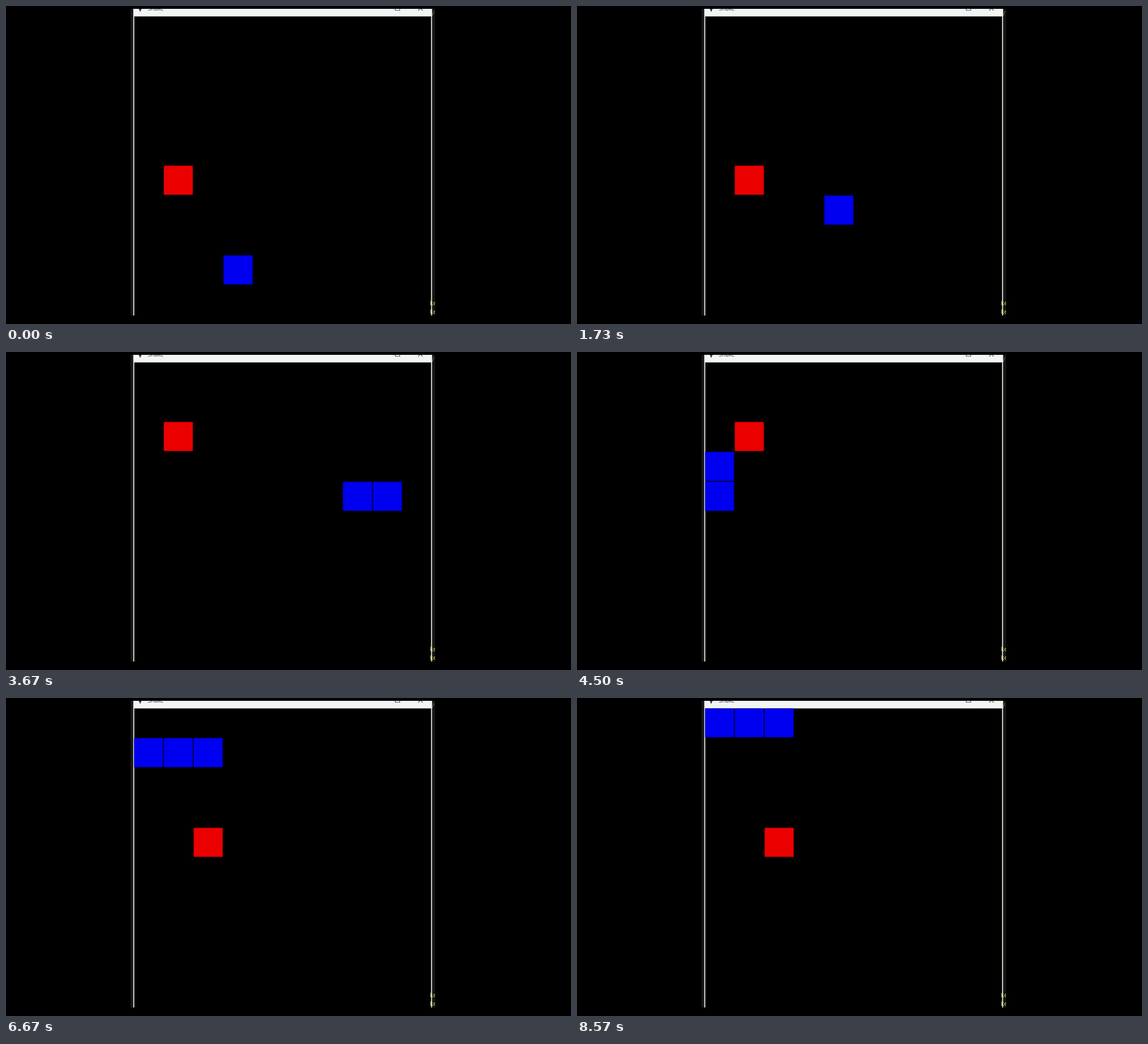
Write an HTML page with a canvas that moves like this. It is 998 by 561 pixels and loops after 8.61 s.

```html
<!DOCTYPE html>
<html lang="en">
<head>
<meta charset="utf-8">
<title>Snake</title>
<style>
  html, body { margin: 0; width: 100%; height: 100%; overflow: hidden; background: #000; }
  canvas { display: block; }
</style>
</head>
<body>
<canvas id="stage" width="998" height="561"></canvas>
<script>
const ctx = document.getElementById('stage').getContext('2d');
const LOOP = 8610;
const STEP = 52.75, LEFT = 225.6, TOP = 17.6, SIZE = 52;

// Sweep upwards, left on even rows and right on odd ones.
function sweep(col, row) {
  const path = [];
  for (; row >= 0; row--) {
    const dir = row % 2 ? 1 : -1;
    const end = row === 7 ? 8 : row % 2 ? 9 : 0;
    for (; col !== end; col += dir) path.push([col, row]);
    path.push([col, row]);
  }
  return path;
}

const route = sweep(3, 8);
const foods = [[1, 5], [1, 2], [2, 4]];
const meals = foods.slice(0, 2).map(food => route.findIndex(pos => `${pos}` === `${food}`));

// [move number, ms]; the pace is even in between, with a stall before move 15.
const pace = [[0, 0], [14, 1410], [15, 1600], [17, 1725], [42, 4480], [55, 5720], [72, 7480], [81, 8550]];

function moveAt(t) {
  const i = pace.findIndex(([, ms]) => t < ms);
  if (i < 0) return route.length - 1;
  const [n0, t0] = pace[i - 1], [n1, t1] = pace[i];
  return Math.floor(n0 + (n1 - n0) * (t - t0) / (t1 - t0));
}

function box(color, x, y, w, h) {
  ctx.fillStyle = color;
  ctx.fillRect(x, y, w, h);
}

function cell([c, r], color, edge) {
  const x = LEFT + c * STEP, y = TOP + r * STEP;
  box(edge, x, y, SIZE, SIZE);
  box(color, x + 0.8, y + 0.8, SIZE - 1.6, SIZE - 1.6);
}

function line(color, width, ...points) {
  ctx.strokeStyle = color;
  ctx.lineWidth = width;
  ctx.beginPath();
  points.forEach(([x, y]) => ctx.lineTo(x, y));
  ctx.stroke();
}

function label(text, x, y, font, color) {
  ctx.font = font;
  ctx.fillStyle = color;
  ctx.fillText(text, x, y);
}

function clip(x, y, w, h) {
  ctx.beginPath();
  ctx.rect(x, y, w, h);
  ctx.clip();
}

function drawWindow() {
  box('#17171b', 220, 5, 5, 541);
  box('#151512', 752, 5, 6, 541);
  box('#000', 226, 18, 525, 528);
  for (const y of [528, 543]) {
    label('ke', 748.5, y, '10px "DejaVu Sans Mono", monospace', '#d2d44a');
  }
  line('#77776c', 1, [753, 17], [756, 9]);

  box('#f4f4ec', 224.8, 5, 1.7, 541);
  box('#f4f4ec', 750.8, 5, 1.7, 541);
  box('#f1f5f3', 225, 5, 527.4, 13.4);

  ctx.fillStyle = '#33363a';
  ctx.beginPath();
  ctx.moveTo(234.5, 5);
  ctx.lineTo(239.5, 5);
  ctx.lineTo(237, 10.5);
  ctx.fill();
  label('Snake', 250.5, 8, '10px "Open Sans", sans-serif', '#33363a');
  line('#555a78', 1.2, [687.5, 4], [687.5, 7.5], [695.5, 7.5], [695.5, 4]);
  line('#55585c', 1.2, [728, 8], [732, 4], [736, 8]);
}

function draw(t) {
  const n = moveAt(t);
  const eaten = meals.filter(m => n >= m).length;
  box('#000', 0, 0, 998, 561);
  ctx.save();
  clip(220, 5, 538, 541);
  drawWindow();
  clip(226.3, 18.4, 524.5, 528);
  cell(foods[eaten], '#eb0000', '#800000');
  for (const pos of route.slice(Math.max(0, n - eaten), n + 1)) cell(pos, '#0000f0', '#000080');
  ctx.restore();
}

const start = performance.now();
function tick() {
  draw((performance.now() - start) % LOOP);
  requestAnimationFrame(tick);
}
tick();
</script>
</body>
</html>
```
